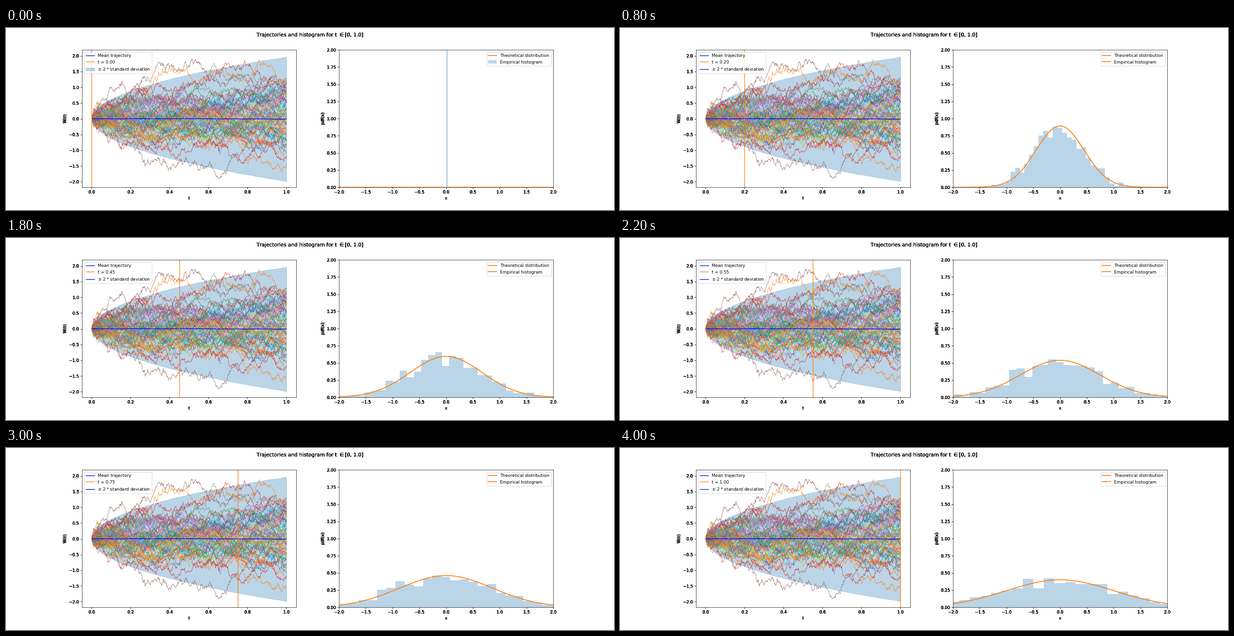
Animation, 1280 px wide and 384 px high, one loop 4.2 s. Source, as a matplotlib script:

```python
import numpy as np
import matplotlib.pyplot as plt
from matplotlib.animation import FuncAnimation
from matplotlib.patheffects import Normal

FRAMES, STEP_MS = 21, 200
STEPS, BINS, SAMPLES, CROWD = 500, 30, 1000, 52
rng = np.random.default_rng(12)
t = np.linspace(0, 1, STEPS + 1)
root = np.sqrt(t)


def walk():
    steps = rng.normal(0, STEPS ** -0.5, STEPS)
    return np.concatenate([[0], np.cumsum(steps)])


def crowd_walk():
    """A walk that stays inside the fan."""
    while True:
        w = walk()
        if np.all(np.abs(w) < np.minimum(1.25, 2 * root + .1)):
            return w


def pinned_walk(points):
    """A walk bent to pass through the given points."""
    ts, ws = zip((0, 0), *points)
    while True:
        w = walk()
        w += np.interp(t, ts, ws - np.interp(ts, t, w))
        if np.abs(w).max() < 1.93:
            return w


def gauss(x, var):
    return np.exp(-x ** 2 / (2 * var)) / np.sqrt(2 * np.pi * var)


# Walks that stray from the crowd: colour and a few points (t, w)
STRAYS = [
    ("C5", [(.1, 1), (.2, .8), (.35, 1.8), (.53, 1.88), (1, .8)]),
    ("C5", [(.28, -1.42), (.45, -1.3), (.64, -1.85), (.77, -1.05), (1, -.8)]),
    ("C1", [(.3, 1), (.42, 1.55), (.55, 1.2), (.86, 1.88), (1, 1.15)]),
    ("C7", [(.5, 1.1), (.63, 1.75), (1, 1.3)]),
    ("C3", [(.6, 1.3), (.82, 1.6), (1, 1.2)]),
    ("C1", [(.65, -.8), (.85, -1.25), (1, -1.58)]),
    ("C3", [(.6, -.7), (.78, -1.38), (1, -1.2)]),
]

fig, (ax, hx) = plt.subplots(1, 2, figsize=(20, 6), dpi=64)
fig.subplots_adjust(left=.125, right=.9, bottom=.125, top=.88, wspace=.2)
OVERPRINT = [Normal(), Normal(offset=(.5, 0))]


def label_twice(a, **style):
    """Set up axes and overprint their labels, which thickens the text."""
    top = fig.add_axes(a.get_position(), frameon=False)
    a.set(**style)
    top.set(**style)
    texts = top.get_xticklabels() + top.get_yticklabels()
    for text in texts + [top.xaxis.label, top.yaxis.label]:
        text.set_path_effects(OVERPRINT)


label_twice(ax, xlim=(-.05, 1.05), ylim=(-2.175, 2.19), xlabel="t", ylabel="W(t)",
            xticks=np.linspace(0, 1, 6), yticks=np.linspace(-2, 2, 9))
label_twice(hx, xlim=(-2, 2), ylim=(0, 2), xlabel="x", ylabel="pdf(x)",
            xticks=np.linspace(-2, 2, 9), yticks=np.linspace(0, 2, 9))

TITLE = r"Trajectories and histogram for t $\in$[0, 1.0]"
fig.suptitle(TITLE)
fig.text(.5, .98, TITLE, size=12, ha="center", va="top", path_effects=OVERPRINT)

# Trajectories
for k in range(CROWD):
    ax.plot(t, crowd_walk(), color=f"C{k % 10}", lw=.75)
for color, points in STRAYS:
    ax.plot(t, pinned_walk(points), color=color, lw=.75)

mean_w = .012 * crowd_walk()
spread = 1.975 * root + .015 * crowd_walk()
band = ax.fill_between(t, mean_w - spread, mean_w + spread, color="C0", alpha=.3)
mean, = ax.plot(t, mean_w, color="blue")
marker = ax.axvline(0, color="C1")

# Distribution: all samples take one random step per frame
jumps = rng.normal(0, (FRAMES - 1) ** -0.5, (FRAMES, SAMPLES))
jumps[0] = 0
samples = np.cumsum(jumps, axis=0)
bars = hx.bar(np.zeros(BINS), np.zeros(BINS), align="edge", color="C0", alpha=.3, lw=0)
x = np.linspace(-2, 2, 400)
curve, = hx.plot([], [], color="C1", lw=2)


def draw(i):
    now = i / (FRAMES - 1)
    marker.set_xdata([now, now])

    limits = (-2.87 * now ** .5, 3.05 * now ** .5) if i else None
    heights, edges = np.histogram(samples[i], BINS, range=limits, density=True)
    for bar, left, h in zip(bars, edges, heights):
        bar.set(x=left, width=edges[1] - edges[0], height=h)
    curve.set_data(x, gauss(x, max(now, 1e-9)))

    labels = ["Mean trajectory", f"t = {now:.2f}", r"$\pm$ 2 * standard deviation"]
    ax.legend([mean, marker, mean if i else band], labels, loc="upper left")
    hx.legend([curve, curve if i else bars],
              ["Theoretical distribution", "Empirical histogram"], loc="upper right")
    return []


anim = FuncAnimation(fig, draw, frames=FRAMES, interval=STEP_MS, init_func=lambda: [],
                     repeat=True, repeat_delay=0)
plt.show()
```
